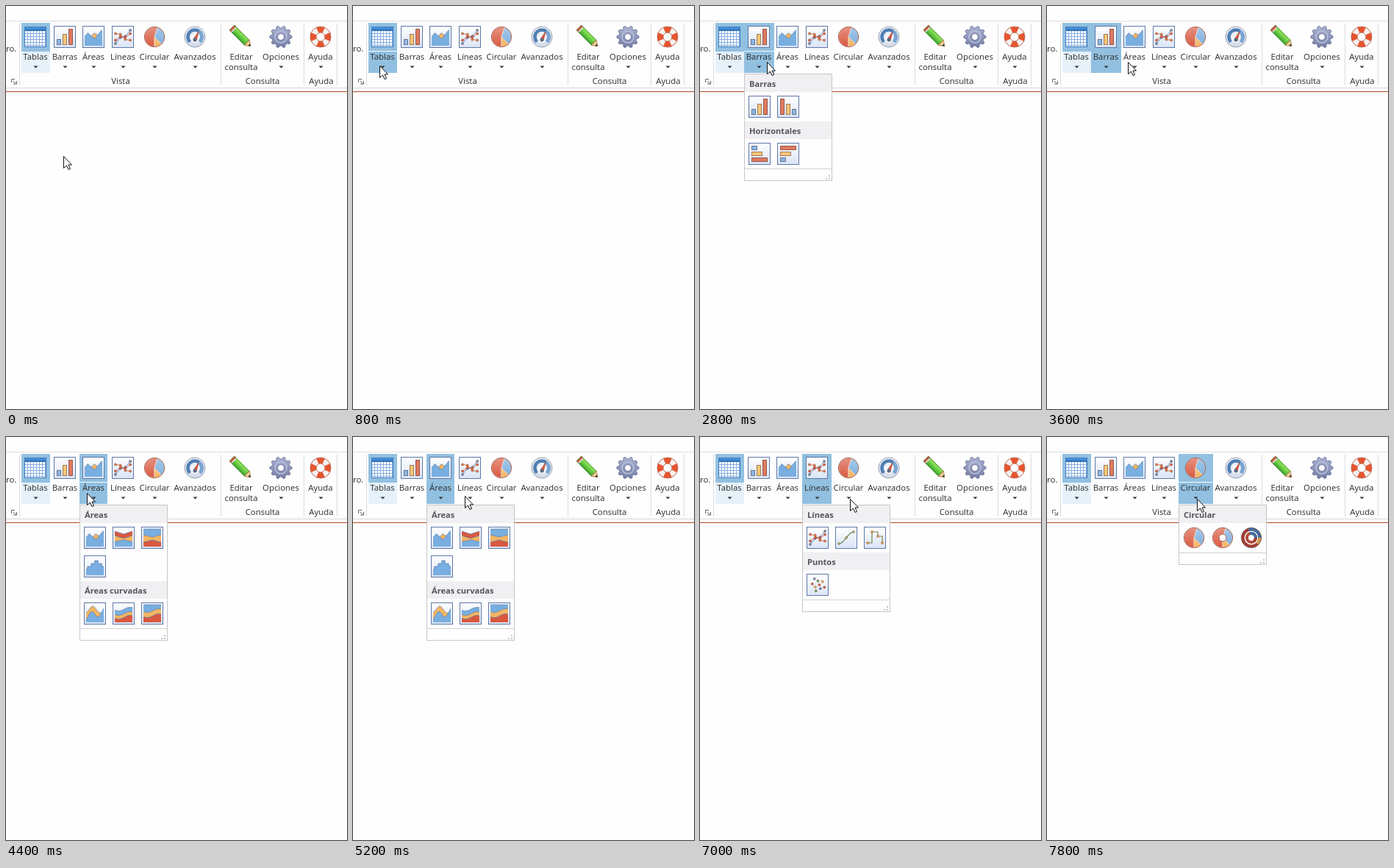
Animation of 464 by 548 pixels, one loop 8 s. Source, as an HTML page with a canvas:

```html
<!DOCTYPE html>
<html lang="es">
<head>
<meta charset="utf-8">
<title>Menús de vista</title>
<style>
html, body { margin: 0; width: 100%; height: 100%; overflow: hidden; background: #fefefe; }
canvas { display: block; }
</style>
</head>
<body>
<canvas id="stage" width="464" height="548"></canvas>
<script>
const ctx = document.getElementById('stage').getContext('2d');
const LOOP = 8000, STEP = 200, FIRST_CLICK = 1000, MENU_TOP = 92, MENU_WIDTH = 120, CELL = 39;
const LABEL = '11.4px "Open Sans", "Noto Sans", sans-serif';
const TITLE = 'bold 11.1px "Open Sans", "Noto Sans", sans-serif';
const RED = '#d9583f', ORANGE = '#f3b562', BLUE = '#78aee0', HOT = '#92c0e0', PAPER = '#fefefe';

// ---- drawing helpers ----

function rect(x, y, w, h, fill) {
  ctx.fillStyle = fill;
  ctx.fillRect(x, y, w, h);
}

function outline(x, y, w, h, color) {
  ctx.strokeStyle = color;
  ctx.lineWidth = 1;
  ctx.strokeRect(x + .5, y + .5, w - 1, h - 1);
}

function paint(fill, stroke, width = 1) {
  if (fill) { ctx.fillStyle = fill; ctx.fill(); }
  if (stroke) { ctx.strokeStyle = stroke; ctx.lineWidth = width; ctx.stroke(); }
}

function path(points, fill, stroke, width) {
  ctx.beginPath();
  for (const [x, y] of points) ctx.lineTo(x, y);
  if (fill) ctx.closePath();
  paint(fill, stroke, width);
}

function disc(x, y, r, fill, stroke, width) {
  ctx.beginPath();
  ctx.arc(x, y, r, 0, 7);
  paint(fill, stroke, width);
}

// Angles in half turns.
function arc(r, from, to, color, width) {
  ctx.beginPath();
  ctx.arc(0, 0, r, from * Math.PI, to * Math.PI);
  paint(null, color, width);
}

function shade(y0, y1, top, bottom) {
  const g = ctx.createLinearGradient(0, y0, 0, y1);
  g.addColorStop(0, top);
  g.addColorStop(1, bottom);
  return g;
}

function at(x, y, drawPart, turn = 0) {
  ctx.save();
  ctx.translate(x, y);
  ctx.rotate(turn * Math.PI);
  drawPart();
  ctx.restore();
}

function text(str, x, y, align = 'center', font = LABEL, color = '#2c2c2c') {
  ctx.font = font;
  ctx.textAlign = align;
  ctx.fillStyle = color;
  ctx.fillText(str, x, y);
}

const arrowHead = (size, color) => path([[-size, 0], [0, -size], [size, 0]], color);
const sample = (n, f) => Array.from({ length: n }, (_, i) => f(i));

// ---- icons, centred on the origin ----

const zigzag = x => 2 / Math.PI * Math.asin(Math.sin(x));
const wave = x => -2.5 * Math.sin((x - 1) / 5);

function card() {
  rect(-15, -15, 30, 30, shade(-15, 15, '#fff', '#d9e4f5'));
  outline(-15, -15, 30, 30, '#5f77a6');
}

function bars(turn = 0, falling = false) {
  card();
  at(0, 0, () => ['#8bb9e8', '#f6c777', '#e07a5e'].forEach((color, i) => {
    const h = 8 + 7 * i, x = -11 + 8 * (falling ? 2 - i : i);
    rect(x, 11 - h, 6, h, color);
    outline(x, 11 - h, 6, h, 'rgba(90,60,70,.55)');
  }), turn);
}

// Areas filled down from a curve, later ones in front.
function areas(...layers) {
  card();
  for (const [color, curve] of layers) {
    const edge = sample(49, i => [i / 2 - 12, curve(i / 2 - 12)]);
    path([...edge, [12, 12], [-12, 12]], color);
    path(edge, null, '#5f7fae', .8);
  }
}

function marks(points, color) {
  for (const [x, y] of points) disc(x, y, 1.6, color, '#8d5040', .5);
}

function series(color, slope) {
  const points = sample(4, i => [-10 + i * 6.7, slope * (i - 1.5) + (i % 2 ? -1.5 : 1.5)]);
  path(points, null, color);
  marks(points, color);
}

function pie(hole = 0) {
  [[.5, 1.6, RED], [1.6, 2.25, BLUE], [.25, .5, ORANGE]].forEach(([from, to, color]) => {
    ctx.beginPath();
    ctx.moveTo(0, 0);
    ctx.arc(0, 0, 13.5, from * Math.PI, to * Math.PI);
    ctx.closePath();
    paint(color, '#efd3c8', .8);
  });
  disc(0, 0, 13.7, shade(-14, 14, 'rgba(255,255,255,.35)', 'rgba(255,255,255,0)'), '#a5604f');
  if (hole) disc(0, 0, hole, PAPER, '#a5604f');
}

function ring(r, color, accent) {
  arc(r, 0, 2, color, 4);
  arc(r, 1.4, 2, '#3f6ea3', 4);
  arc(r, 0, .25, accent, 4);
}

function swapArrow(color) {
  arc(4.5, .9, 1.6, color, 3.5);
  at(3, -4, () => arrowHead(4, color), .6);
}

const icons = {
  table() {
    rect(-15, -14, 30, 28, '#fff');
    for (let x = -11; x < 15; x += 4) rect(x, -8, 1, 22, '#86aee0');
    for (let y = -5; y < 14; y += 4) rect(-15, y, 30, 1, '#86aee0');
    rect(-15, -14, 30, 6, shade(-14, -8, '#58a6ea', '#2a69b2'));
    outline(-15, -14, 30, 28, '#3f7cc2');
  },
  pivot() {
    rect(-14, -14, 28, 28, '#fff');
    rect(-12, -12, 24, 5, '#c3c7cf');
    rect(-12, -12, 5, 24, '#c3c7cf');
    rect(-7, -12, 1, 24, '#fff');
    outline(-14, -14, 28, 28, '#777e8c');
    at(-1, 1, () => arc(7, 0, .5, '#4d7fae', 2));
    at(6, 1, () => arrowHead(4, '#4d7fae'));
    at(-1, 8, () => arrowHead(4, '#4d7fae'), -.5);
  },
  crosstab() {
    rect(-14, -14, 28, 28, '#fff');
    for (let i = -14; i < 14; i += 9) {
      rect(i, -14, 1, 28, '#868b96');
      rect(-14, i, 28, 1, '#868b96');
    }
    at(5, 4, () => swapArrow('#3fb52f'));
    at(9, 9, () => swapArrow('#e8603a'), 1);
  },
  person() {
    rect(-14, -9, 28, 19, '#fff');
    outline(-14, -9, 28, 19, '#4e82bb');
    disc(-6, -3, 4, '#4a3527');
    disc(-6, -2, 2.7, '#e8b98f');
    path([[-12, 8], [-10, 3], [-2, 3], [0, 8]], '#3f4650');
    path([[-8, 3], [-6, 7], [-4, 3]], RED);
    for (const y of [-3, 0, 3]) rect(3, y, 8, 1, '#6b9ed0');
  },
  bars: () => bars(),
  barsFalling: () => bars(0, true),
  barsFlat: () => bars(.5),
  barsFlatFalling: () => bars(.5, true),
  area: () => areas([ORANGE, x => -2 - x / 4 + 3 * zigzag(x / 2.3 - 2)], [BLUE, x => -2 - x / 5 + 5 * zigzag(x / 3 + 1)]),
  areaStack: () => areas([RED, x => -5 - Math.abs(x) / 3], [ORANGE, x => 1 - Math.abs(x) / 3], [BLUE, x => 3 + Math.abs(x) / 5]),
  areaFull: () => areas([BLUE, () => -12], [ORANGE, x => -1 - Math.abs(x) / 4], [RED, x => 3 + Math.abs(x) / 4]),
  areaStep: () => areas([BLUE, x => -8 + 4 * Math.round(Math.abs(x - 2) / 5)]),
  areaCurve: () => areas([ORANGE, x => -10 * Math.exp(-((x + 3) ** 2) / 40)], [BLUE, x => 1 - x / 3 + 5 * Math.sin(x / 3)]),
  areaCurveStack: () => areas([BLUE, x => wave(x) - 6], [ORANGE, x => wave(x)], [RED, x => wave(x) + 5]),
  areaCurveFull: () => areas([BLUE, () => -12], [ORANGE, x => wave(x) - 4], [RED, x => wave(x) + 3]),
  lines() {
    card();
    series('#5f93cf', -5);
    series(RED, -2);
    series('#dd7a4a', 4);
  },
  curve() {
    card();
    const y = x => -8 * Math.sin(x / 6.5);
    path(sample(21, i => [i - 10, y(i - 10)]), null, '#55824e', 1.2);
    marks([-10, 0, 10].map(x => [x, y(x)]), '#9fc36a');
  },
  steps() {
    card();
    const corners = [[-10, 7], [-4, 7], [-4, -8], [4, -8], [4, -2], [10, -2], [10, 7]];
    path(corners, null, '#74804e', 1.2);
    marks(corners.filter((_, i) => i % 2 === 0), '#e3ae4c');
  },
  points() {
    card();
    const colors = [RED, ORANGE, '#68a65b', '#5b91cf'];
    for (let i = 0; i < 9; i++) {
      const r = 3.4 * Math.sqrt(i + .5), a = i * 2.4;
      marks([[r * Math.cos(a), r * Math.sin(a)]], colors[i % 4]);
    }
  },
  pie: () => pie(),
  donut: () => pie(5),
  rings() {
    ring(11.5, '#a33c32', '#d69a4b');
    ring(6, '#b4473a', '#a33c32');
    disc(0, 0, 13.7, null, '#63494c', .8);
  },
  gauge() {
    disc(0, 0, 14, shade(-14, 14, '#f6f8fb', '#d3dae6'), '#929db3');
    arc(9.5, .75, 2.25, '#4f7fb4', 4.5);
    arc(9.5, 1.7, 2.25, '#78a6d4', 4.5);
    disc(0, 2, 6, '#f4f6fa');
    path([[-2, 3], [5, -7], [2, 5]], '#e15b42', '#a63825', .7);
    disc(0, 4, 2.5, '#5b6982');
  },
  pencil: () => at(0, 0, () => {
    rect(-18, -5, 5, 10, RED);
    rect(-15, -5, 2, 10, '#d5d8d8');
    rect(-13, -5, 24, 10, shade(-5, 5, '#9cf060', '#3aa52a'));
    outline(-18, -5, 29, 10, 'rgba(40,110,30,.6)');
    path([[11, -5], [18, 0], [11, 5]], '#f0cf98', '#b28d56');
    path([[15, -2], [18, 0], [15, 2]], '#333');
  }, .25),
  gear() {
    const teeth = sample(41, i => {
      const r = i % 4 < 2 ? 15 : 12, a = (i - .5) * Math.PI / 20;
      return [r * Math.cos(a), r * Math.sin(a)];
    });
    path(teeth, shade(-15, 15, '#adb5d6', '#737ca3'), '#6d769c');
    disc(0, 0, 8, null, '#bac1dc', 1.5);
    disc(0, 0, 4.5, PAPER, '#6d769c');
  },
  buoy() {
    arc(10, 0, 2, '#f5f3f2', 8);
    for (let k = 0; k < 2; k += .5) arc(10, k - .14, k + .14, '#e6552f', 8);
    for (const r of [6, 14]) disc(0, 0, r, null, '#bd6a55');
  }
};

// ---- ribbon, menus and pointer ----

// Each menu section: title, then its icons, three to a row.
const buttons = [
  { label: 'Tablas', icon: 'table', left: 21, hotAt: 800, menu: [['Tablas', 'table', 'pivot', 'crosstab', 'person']] },
  { label: 'Barras', icon: 'bars', left: 60, hotAt: 2600, menu: [['Barras', 'bars', 'barsFalling'], ['Horizontales', 'barsFlat', 'barsFlatFalling']] },
  { label: 'Áreas', icon: 'area', left: 100, hotAt: 3800, menu: [['Áreas', 'area', 'areaStack', 'areaFull', 'areaStep'], ['Áreas curvadas', 'areaCurve', 'areaCurveStack', 'areaCurveFull']] },
  { label: 'Líneas', icon: 'lines', left: 139, hotAt: 5600, menu: [['Líneas', 'lines', 'curve', 'steps'], ['Puntos', 'points']] },
  { label: 'Circular', icon: 'pie', left: 179, hotAt: 7400, menu: [['Circular', 'pie', 'donut', 'rings']] },
  { label: 'Avanzados', icon: 'gauge', left: 226 },
  { label: 'Editar', second: 'consulta', icon: 'pencil', left: 301 },
  { label: 'Opciones', icon: 'gear', left: 346 },
  { label: 'Ayuda', icon: 'buoy', left: 409 }
];
ctx.font = LABEL;
for (const b of buttons) {
  b.width = Math.max(38, Math.round(ctx.measureText(b.label).width) + 6);
  b.mid = b.left + Math.floor(b.width / 2);
}

const visited = buttons.filter(b => b.menu);
const stops = [[78, 204], [36, 81], [72, 76], [110, 76], [152, 80], [204, 84]];

// The pointer glides to each button and rests just before it lights up.
function pointerAt(t) {
  let [x, y] = stops[0];
  visited.forEach(({ hotAt }, i) => {
    const end = hotAt - STEP, start = Math.max(0, end - 1000);
    const u = Math.min(1, Math.max(0, (t - start) / (end - start)));
    const ease = 1 - (1 - u) ** 3;
    x += (stops[i + 1][0] - x) * ease;
    y += (stops[i + 1][1] - y) * ease;
  });
  return [Math.round(x), Math.round(y)];
}

function drawButton(b, active, pointerX) {
  if (b === active) {
    rect(b.left, 23, b.width, 68, HOT);
    if (pointerX >= b.left && pointerX < b.left + b.width) rect(b.left, 61, b.width, 1, '#f4f9fd');
  } else if (b === buttons[0]) {
    rect(b.left, 23, b.width, 39, HOT);
    rect(b.left, 62, b.width, 29, '#e6f1fa');
  }
  at(b.mid, 42, icons[b.icon]);
  text(b.label, b.mid, 73);
  if (b.second) text(b.second, b.mid, 87);
  else at(b.mid + .5, 81.5, () => arrowHead(3, '#333'), 1);
}

function drawRibbon(active, pointerX) {
  rect(0, 0, 464, 548, PAPER);
  rect(0, 20, 464, 1, '#dedede');
  rect(0, 111, 464, 1, '#d6d6d6');
  rect(0, 116, 464, 1, '#b7472a');
  for (const x of [18, 292, 405, 450]) rect(x, 24, 1, 84, '#dcdcdc');
  text('ro.', 0, 62, 'left');
  text('Vista', 156, 106);
  text('Consulta', 349, 106);
  text('Ayuda', 429, 106);
  path([[7.5, 104], [7.5, 99.5], [12, 99.5]], null, '#666');
  path([[10, 102], [14, 106]], null, '#666');
  path([[14.5, 102], [14.5, 106], [10, 106]], null, '#666');
  for (const b of buttons) drawButton(b, active, pointerX);
}

function drawMenu({ left, menu }) {
  const sectionHeight = names => 25 + Math.ceil(names.length / 3) * CELL;
  const end = menu.reduce((y, [, ...names]) => y + sectionHeight(names), MENU_TOP + 1);
  const height = end + 17 - MENU_TOP;
  rect(left, MENU_TOP, MENU_WIDTH, height, PAPER);
  let y = MENU_TOP + 1;
  for (const [title, ...names] of menu) {
    rect(left + 1, y, MENU_WIDTH - 2, 24, '#f0f0f3');
    text(title, left + 7, y + 17, 'left', TITLE, '#55555b');
    names.forEach((name, i) => at(left + 21 + i % 3 * CELL, y + 44 + Math.floor(i / 3) * CELL, icons[name]));
    y += sectionHeight(names);
  }
  rect(left, end, MENU_WIDTH, 1, '#d2d2d2');
  outline(left, MENU_TOP, MENU_WIDTH, height, '#c6c6c6');
  for (let row = 0; row < 2; row++)
    for (let i = 0; i <= row; i++) rect(left + 115 - i * 4, end + 9 + row * 4, 2, 2, '#c4c4c4');
}

function drawPointer() {
  path([[0, 0], [0, 16], [4, 12.5], [6.5, 18], [9, 17], [6.5, 11.5], [11, 11.5], [0, 0]], '#fff', '#111');
}

function draw(now) {
  const t = Math.floor(now % LOOP / STEP) * STEP;
  const [x, y] = pointerAt(t);
  const active = visited.findLast(b => t >= b.hotAt);
  const next = visited.find(b => t < b.hotAt);
  const closing = next && t >= next.hotAt - STEP;
  drawRibbon(active, x);
  if (active && t >= FIRST_CLICK && !closing) drawMenu(active);
  at(x + .5, y + .5, drawPointer);
}

const start = performance.now();
function tick() {
  draw(performance.now() - start);
  requestAnimationFrame(tick);
}
tick();
</script>
</body>
</html>
```
